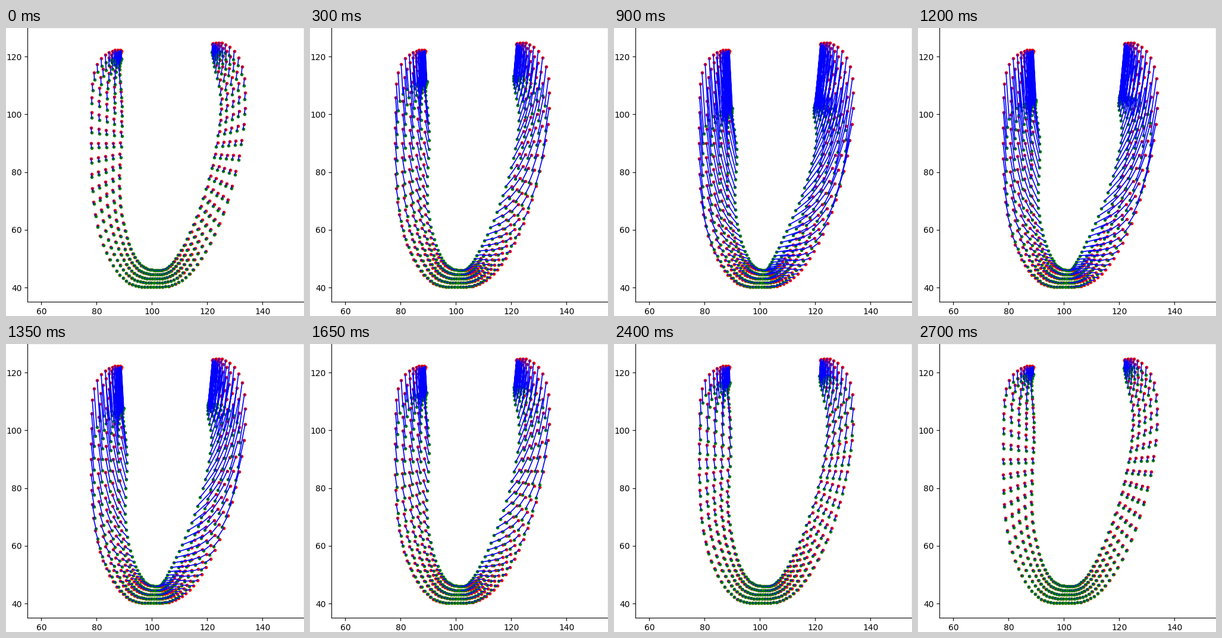
Animation of 501x485 px, one loop 2.85 s. Source, as a matplotlib script:

```python
import numpy as np
import matplotlib.pyplot as plt
from matplotlib.animation import FuncAnimation

WIDTH, HEIGHT, DPI = 501, 485, 100
FRAMES, INTERVAL = 19, 150
HALF, LAYERS = 37, 5
LEFT, BASE, AX_W, AX_H = 36.22, 461.42, 465, 462

row = np.arange(-HALF, HALF + 1)  # nodes along the wall, apex at 0
depth = np.linspace(0, 1, LAYERS)[:, None]  # outer to inner layer


def spline(knots, values, at):
    """Natural cubic spline through (knots, values), sampled at `at`."""
    t, v = np.asarray(knots, float), np.asarray(values, float)
    h, n = np.diff(t), len(t)
    system, rhs = np.eye(n), np.zeros(n)
    for i in range(1, n - 1):
        system[i, i - 1:i + 2] = h[i - 1], 2 * (h[i - 1] + h[i]), h[i]
        rhs[i] = 6 * ((v[i + 1] - v[i]) / h[i] - (v[i] - v[i - 1]) / h[i - 1])
    m = np.linalg.solve(system, rhs)
    k = np.clip(np.searchsorted(t, at, side="right") - 1, 0, n - 2)
    a, b, w = t[k + 1] - at, at - t[k], h[k]
    return ((m[k] * a**3 + m[k + 1] * b**3) / (6 * w)
            + (v[k] / w - m[k] * w / 6) * a
            + (v[k + 1] / w - m[k + 1] * w / 6) * b)


def wall(points):
    """Smooth wall through a few key points, in pixels."""
    side = np.array([13, 20, 26, 29, 32, HALF])
    knots = np.concatenate([-side[::-1], [0], side])
    x, y = np.transpose(points)
    return spline(knots, x, row), spline(knots, y, row)


def between(outer, inner):
    return outer + (inner - outer) * depth


outer_x, outer_y = wall([
    (192, 37.5), (167, 45), (148, 75), (143.5, 142), (147, 293), (180, 400),
    (248, 436),
    (322, 398), (373, 289), (402, 135), (397, 65), (376, 32), (348, 26)])
inner_x, inner_y = wall([
    (194, 39), (190, 67), (193, 107), (194, 157), (190, 266), (206, 363),
    (252, 408),
    (301, 365), (339, 267), (361, 155), (362, 102), (354, 62), (347, 28)])
rest_x, rest_y = between(outer_x, inner_x), between(outer_y, inner_y)

# Full contraction: walls bulge inwards, nodes sink towards the apex.
reach = np.abs(row) / HALF
on_right = row > 0
bulge = between(np.where(on_right, 8, 3), np.where(on_right, 24, 10.5))
drift = np.where(on_right, 9, 5)
move_x = -np.sign(row) * (bulge * np.sin(np.pi * reach) + drift * reach)
height = np.maximum(between(428, 410) - rest_y, 0)
move_y = 0.32 * height**2 / (height + 95)


def step(t, middle, width):
    return 1 / (1 + np.exp((middle - t) / width))


def beat(t, rest, peak, plateau, fall, fall_width):
    """Contract, relax to a plateau, then return to rest."""
    return (rest + (peak - rest) * step(t, 2.1, 0.65)
            - (peak - plateau) * step(t, fall, fall_width)
            - (plateau - rest) * step(t, 16.6, 0.7))


def to_data(px, py):
    return 55 + (px - LEFT) * 100 / AX_W, 35 + (BASE - py) * 95 / AX_H


def flat_data(px, py):
    x, y = to_data(px, py)
    return x.ravel(), y.ravel()


def joined(start, end):
    return np.column_stack([start, end, np.full(len(start), np.nan)]).ravel()


fig = plt.figure(figsize=((WIDTH + .001) / DPI, (HEIGHT + .001) / DPI), dpi=DPI)
ax = fig.add_axes([LEFT / WIDTH, (HEIGHT - BASE) / HEIGHT, AX_W / WIDTH, AX_H / HEIGHT])
ax.set(xlim=(55, 155), ylim=(35, 130),
       xticks=range(60, 141, 20), yticks=range(40, 121, 20))

start_x, start_y = flat_data(rest_x, rest_y)
ax.plot(start_x, start_y, "r.")
moved, = ax.plot([], [], "g.")
links, = ax.plot([], [], "b-", lw=1.2)


def update(frame):
    inward = beat(frame, 0.06, 1.03, 0.23, 10, 1.3)
    sink = beat(frame, 0.10, 1.05, 0.34, 9.2, 1.1)
    x, y = flat_data(rest_x + move_x * inward, rest_y + move_y * sink)
    moved.set_data(x, y)
    links.set_data(joined(start_x, x), joined(start_y, y))
    return moved, links


anim = FuncAnimation(fig, update, frames=FRAMES, interval=INTERVAL,
                     repeat=True, repeat_delay=0)
plt.show()
```
